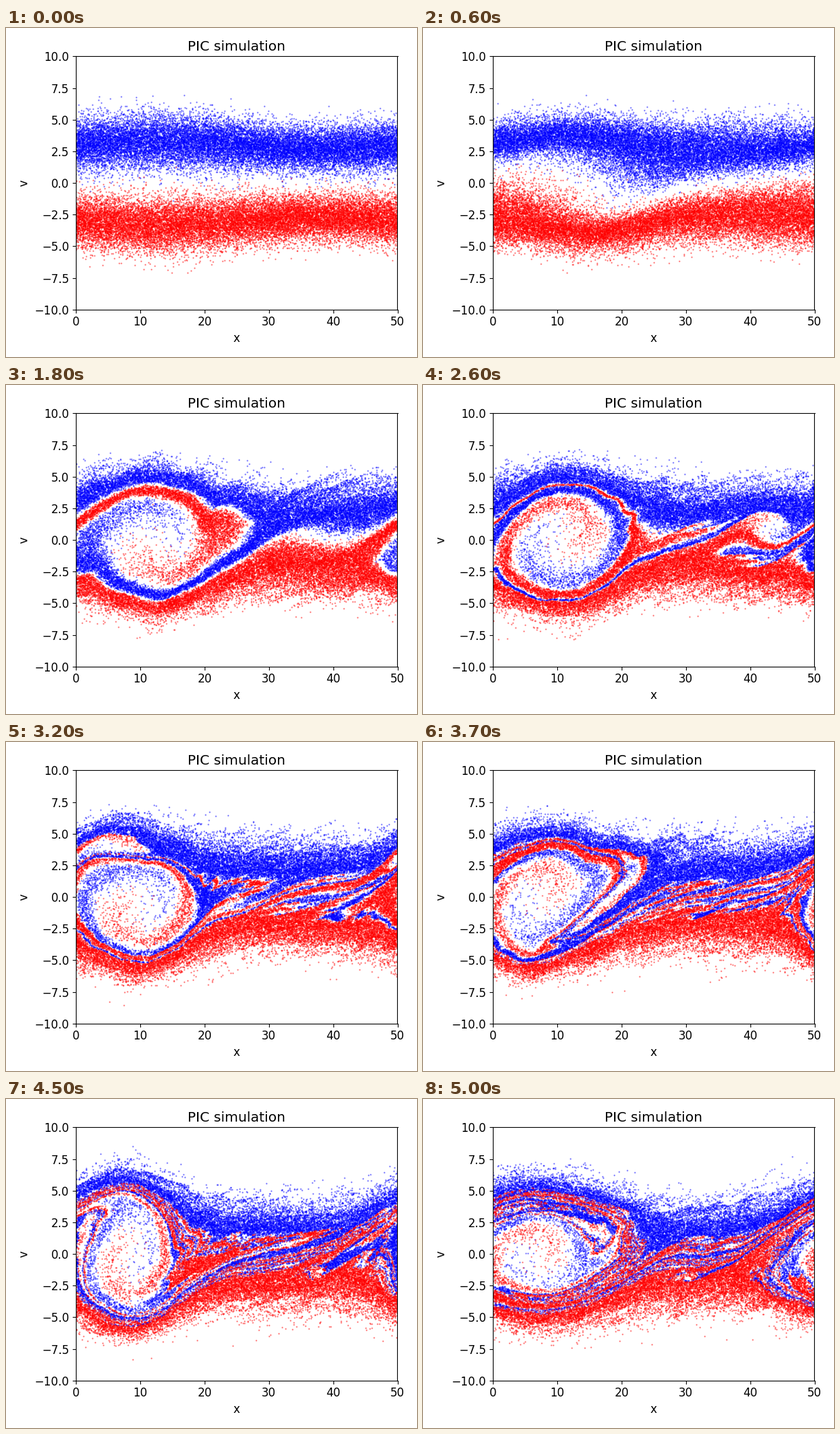
A matplotlib script that plays this animation: 600 px wide and 480 px high, repeating every 5100 ms.

```python
"""Two-stream instability in a 1D particle-in-cell plasma."""
import numpy as np
import matplotlib.pyplot as plt
from matplotlib.animation import FuncAnimation

N = 40000        # particles, half in each beam
CELLS = 400
BOX = 50.0
DX = BOX / CELLS
STEPS = 51
DT = 1.0
BEAM_SPEED, THERMAL_SPEED, RIPPLE = 3.0, 1.0, 0.1

# Spectral form of the central-difference gradient over the periodic Laplacian.
theta = 2 * np.pi * np.fft.rfftfreq(CELLS)
laplacian = (2 * np.cos(theta) - 2) / DX**2
laplacian[0] = 1.0
GRADIENT_OVER_LAPLACIAN = 1j * np.sin(theta) / DX / laplacian


def acceleration(pos):
    cell = np.floor(pos / DX).astype(int)
    right_weight = pos / DX - cell
    left_weight = 1 - right_weight
    left = cell % CELLS
    right = (cell + 1) % CELLS
    density = np.bincount(left, left_weight, CELLS)
    density += np.bincount(right, right_weight, CELLS)
    density *= BOX / N / DX
    push = np.fft.irfft(np.fft.rfft(density - 1) * GRADIENT_OVER_LAPLACIAN, CELLS)
    return left_weight * push[left] + right_weight * push[right]


def initial_state():
    np.random.seed(42)
    pos = np.random.rand(N) * BOX
    vel = THERMAL_SPEED * np.random.randn(N) + BEAM_SPEED
    vel[N // 2:] *= -1
    vel *= 1 + RIPPLE * np.sin(2 * np.pi * pos / BOX)
    return pos, vel


def simulate():
    pos, vel = initial_state()
    acc = acceleration(pos)
    states = [np.column_stack((pos, vel))]
    for _ in range(STEPS - 1):
        vel = vel + acc * DT / 2
        pos = (pos + vel * DT) % BOX
        acc = acceleration(pos)
        vel = vel + acc * DT / 2
        states.append(np.column_stack((pos, vel)))
    return states


states = simulate()
half = N // 2

plt.rcParams["font.size"] = 12
fig, ax = plt.subplots(figsize=(6, 4.8), dpi=100)
ax.set(xlim=(0, BOX), ylim=(-10, 10), xlabel="x", ylabel="v",
       title="PIC simulation")
blue, red = (
    ax.scatter(*states[0][beam].T, s=0.4, color=color, alpha=0.5)
    for beam, color in ((slice(0, half), "blue"), (slice(half, N), "red"))
)
fig.tight_layout()


def update(frame):
    blue.set_offsets(states[frame][:half])
    red.set_offsets(states[frame][half:])
    return blue, red


anim = FuncAnimation(fig, update, frames=STEPS, interval=100, repeat=True)
plt.show()
```
